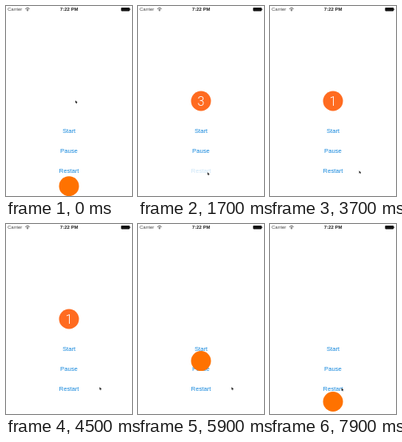
Recreate the animation shown at these times as an HTML page with a canvas. Size 158 px wide and 238 px high, loop 8000 ms.

```html
<!DOCTYPE html>
<html lang="en">
<head>
<meta charset="utf-8">
<title>Countdown ball</title>
<style>
html, body { margin: 0; width: 100%; height: 100%; overflow: hidden; background: #fff; }
canvas { display: block; width: 158px; height: 238px; }
</style>
</head>
<body>
<canvas id="stage"></canvas>
<script>
const W = 158, H = 238, LOOP = 8000, STEP = 100;
const SANS = '"Liberation Sans", Arial, sans-serif';
const THIN = 'Roboto, "Liberation Sans", sans-serif';
const BALL = { x: 79, r: 12.5, top: 119, floor: 225.7 };
const RESET = 1600, DROP = 4700, GRAVITY = 494, BOUNCE = 0.72;

// time, x, y of the pointer tip
const POINTER = [
  [0, 87, 118.3], [100, 87, 118.3], [250, 96, 150], [450, 104, 186],
  [700, 98, 204], [900, 95, 208], [1300, 87.2, 208.2], [2900, 87.2, 208.2],
  [3500, 111.7, 206.2], [3800, 111.7, 206.2], [4300, 117.3, 204.3],
  [6000, 117.3, 204.3], [6300, 106.5, 205], [6700, 93.2, 206],
  [6900, 93, 206], [7200, 90, 205.5], [8000, 89.6, 205.5]
];

const canvas = document.getElementById('stage');
const ctx = canvas.getContext('2d');
const dpr = window.devicePixelRatio || 1;
canvas.width = W * dpr;
canvas.height = H * dpr;

const clamp = v => Math.max(0, Math.min(1, v));

function text(str, x, y, font, color, align = 'center') {
  ctx.font = font;
  ctx.fillStyle = color;
  ctx.textAlign = align;
  ctx.fillText(str, x, y);
}

function pointerAt(t) {
  let i = 1;
  while (i < POINTER.length - 1 && POINTER[i][0] < t) i++;
  const [t0, x0, y0] = POINTER[i - 1], [t1, x1, y1] = POINTER[i];
  const k = clamp((t - t0) / (t1 - t0));
  return [x0 + (x1 - x0) * k, y0 + (y1 - y0) * k];
}

function ballY(t) {
  if (t < RESET) return BALL.floor;
  if (t < DROP) return BALL.top;
  const fall = Math.sqrt(2 * (BALL.floor - BALL.top) / GRAVITY);
  let s = (t - DROP) / 1000;
  if (s < fall) return BALL.top + GRAVITY * s * s / 2;
  s -= fall;
  let v = GRAVITY * fall * BOUNCE;
  while (v > 5 && s > 2 * v / GRAVITY) {
    s -= 2 * v / GRAVITY;
    v *= BOUNCE;
  }
  return v > 5 ? BALL.floor - v * s + GRAVITY * s * s / 2 : BALL.floor;
}

function restartAlpha(t) {
  if (t < 1500) return 1;
  return t < 1800 ? 0.22 : 0.22 + 0.78 * clamp((t - 1800) / 400);
}

function statusBar() {
  text('Carrier', 2, 6.4, '6px ' + SANS, '#444', 'left');
  text('7:22 PM', 79.2, 6.4, 'bold 6px ' + SANS, '#222');
  ctx.strokeStyle = '#333';
  ctx.lineWidth = 0.8;
  for (const r of [1.8, 3.6]) {
    ctx.beginPath();
    ctx.arc(27, 6, r, -Math.PI * 0.77, -Math.PI * 0.23);
    ctx.stroke();
  }
  ctx.fillStyle = '#333';
  ctx.beginPath();
  ctx.arc(27, 5.8, 0.7, 0, 7);
  ctx.fill();
  ctx.fillStyle = '#111';
  ctx.beginPath();
  ctx.roundRect(144.3, 2, 10.8, 4.4, 0.8);
  ctx.fill();
  ctx.fillRect(155.4, 3.4, 0.7, 1.6);
}

function button(label, y, alpha = 1) {
  ctx.globalAlpha = alpha;
  text(label, BALL.x, y, '7.7px ' + SANS, '#1487dc');
  ctx.globalAlpha = 1;
}

function ball(t) {
  const counting = t >= RESET && t < DROP;
  const y = ballY(t);
  ctx.fillStyle = counting ? '#ff6b20' : '#ff7200';
  ctx.beginPath();
  ctx.arc(BALL.x, y, BALL.r, 0, 7);
  ctx.fill();
  if (counting) {
    const n = Math.max(1, 3 - Math.floor((t - RESET) / 1000));
    text(String(n), BALL.x, y + 5.8, '300 16px ' + THIN, '#fff');
  }
}

function pointer(t) {
  const [x, y] = pointerAt(t);
  ctx.save();
  ctx.translate(x, y);
  ctx.fillStyle = '#222';
  ctx.beginPath();
  ctx.moveTo(0, 0);
  ctx.lineTo(0, 3.5);
  ctx.lineTo(0.9, 2.8);
  ctx.lineTo(1.5, 4.1);
  ctx.lineTo(2.1, 3.8);
  ctx.lineTo(1.6, 2.6);
  ctx.lineTo(2.7, 2.5);
  ctx.fill();
  ctx.restore();
}

function draw(t) {
  ctx.setTransform(dpr, 0, 0, dpr, 0, 0);
  ctx.fillStyle = '#fff';
  ctx.fillRect(0, 0, W, H);
  statusBar();
  button('Start', 159.4);
  button('Pause', 184.4);
  button('Restart', 209.4, restartAlpha(t));
  ball(t);
  pointer(t);
}

const start = performance.now();
function frame() {
  const t = (performance.now() - start) % LOOP;
  draw(Math.floor(t / STEP) * STEP);
  requestAnimationFrame(frame);
}
frame();
</script>
</body>
</html>
```
